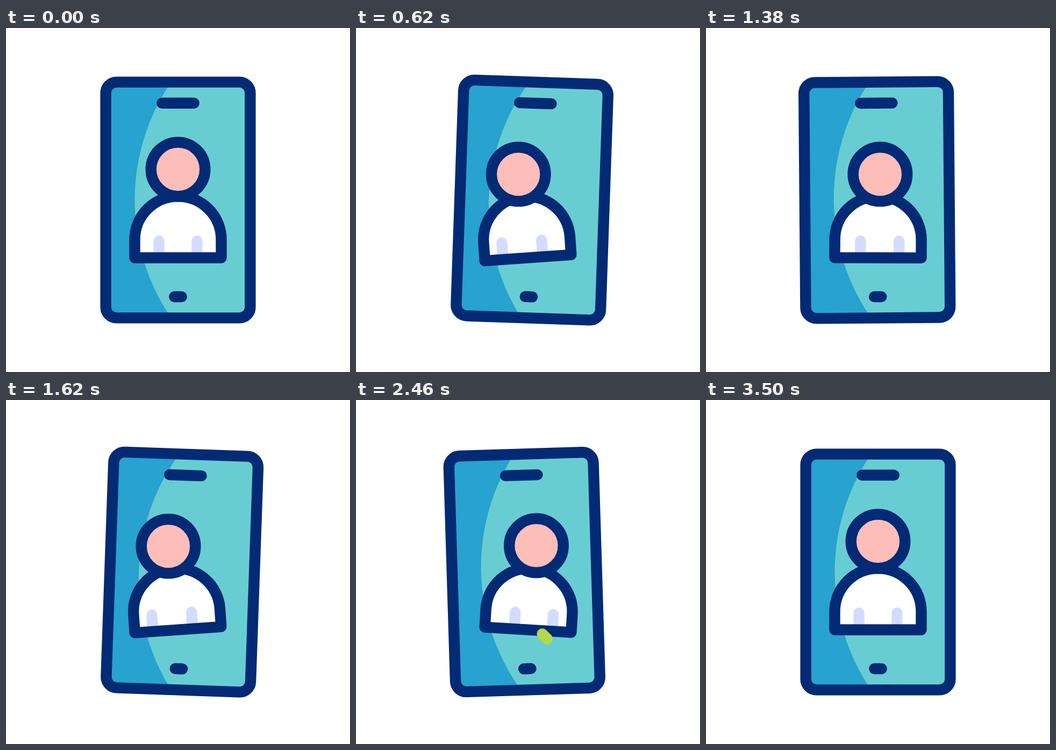
Animation, 640 px wide and 640 px high, one loop 3600 ms. Source, as an HTML page with a canvas:

```html
<!DOCTYPE html>
<html lang="en">
<head>
<meta charset="utf-8">
<title>Phone profile</title>
<style>
  html, body { margin: 0; width: 100%; height: 100%; overflow: hidden; background: #fff; }
  canvas { display: block; width: 640px; height: 640px; }
</style>
</head>
<body>
<canvas id="stage" width="640" height="640"></canvas>
<script>
const ctx = document.getElementById('stage').getContext('2d');
const LOOP = 3600;
const STROKE = 20.4;
const NAVY = '#022a75', TEAL = '#68cdd2', BLUE = '#28a2ce';
const SKIN = '#fdbdb9', LILAC = '#d3dcff', GREEN = '#b2d94a';

// Start and end of each swing, in ms
const SWINGS = [[5, 440], [602, 1045], [1208, 1618], [1775, 2225], [2370, 2785]];
const BODY_SWINGS = [[5, 440], [602, 1078], [1205, 1570], [1780, 2250], [2370, 2785]];

function ease(t, start, end) {
  const u = Math.min(1, Math.max(0, (t - start) / (end - start)));
  return u * u * (3 - 2 * u);
}

// Moves from values[i] to values[i + 1] during spans[i]
function track(t, spans, values) {
  return spans.reduce(
    (v, [a, b], i) => v + (values[i + 1] - values[i]) * ease(t, a, b), values[0]);
}

const swing = (t, first, second) => track(t, SWINGS, [0, first, second, first, second, 0]);

function rotated(degrees, x, y, draw) {
  ctx.save();
  ctx.translate(x, y);
  ctx.rotate(degrees * Math.PI / 180);
  ctx.translate(-x, -y);
  draw();
  ctx.restore();
}

function line(color, ...points) {
  ctx.beginPath();
  points.forEach(([x, y]) => ctx.lineTo(x, y));
  ctx.strokeStyle = color;
  ctx.stroke();
}

function paint(fill) {
  ctx.fillStyle = fill;
  ctx.fill();
  ctx.strokeStyle = NAVY;
  ctx.stroke();
}

function drawPhone() {
  const frame = new Path2D();
  frame.roundRect(185.6, 100.6, 268.8, 438.8, 20);
  ctx.save();
  ctx.clip(frame);
  ctx.fillStyle = BLUE;
  ctx.fillRect(180, 95, 280, 450);
  ctx.beginPath();
  ctx.arc(629.5, 320, 390, 0, Math.PI * 2);
  ctx.fillStyle = TEAL;
  ctx.fill();
  ctx.restore();
  ctx.strokeStyle = NAVY;
  ctx.stroke(frame);
  line(NAVY, [290.3, 139.8], [349.7, 139.8]);
  line(NAVY, [313.3, 500], [326.7, 500]);
}

function drawBody(leftShift, rightShift) {
  const shape = new Path2D('M239.5 427.5V393.7A80.5 80.5 0 0 1 400.5 393.7V427.5Z');
  ctx.fillStyle = '#fff';
  ctx.fill(shape);
  for (const x of [284.6 + leftShift, 355.3 + rightShift]) {
    line(LILAC, [x, 396.3], [x, 422]);
  }
  ctx.strokeStyle = NAVY;
  ctx.stroke(shape);
}

function drawHead(x, y) {
  ctx.beginPath();
  ctx.arc(x, y, 50.3, 0, Math.PI * 2);
  paint(SKIN);
}

function drawCheck(amount) {
  if (amount <= 0) return;
  const shortLeg = 20.3, longLeg = 41;
  const reach = amount * (shortLeg + longLeg);
  const down = Math.min(reach, shortLeg);
  const up = Math.max(0, reach - shortLeg);
  const x = 346.6, y = 435.2;
  line(GREEN, [x, y], [x + down, y + down], [x + down + up, y + down - up]);
}

function render(t) {
  ctx.fillStyle = '#fff';
  ctx.fillRect(0, 0, 640, 640);
  ctx.lineWidth = STROKE;
  ctx.lineCap = ctx.lineJoin = 'round';

  rotated(swing(t, 2, -2), 320, 540, drawPhone);

  const lean = track(t, BODY_SWINGS, [0, -4, 4, -4, 4, 0]);
  rotated(lean, 320, 427.5, () => drawBody(swing(t, -11.3, 11.3), swing(t, -8, 11.3)));

  const drop = 9.2 * (ease(t, ...SWINGS[0]) - ease(t, ...SWINGS[4]));
  drawHead(320 + swing(t, -18, 17.6), 262.9 + drop);

  drawCheck(ease(t, 2370, 2740) - ease(t, 3185, 3500));
}

function tick() {
  render(performance.now() % LOOP);
  requestAnimationFrame(tick);
}
tick();
</script>
</body>
</html>
```
